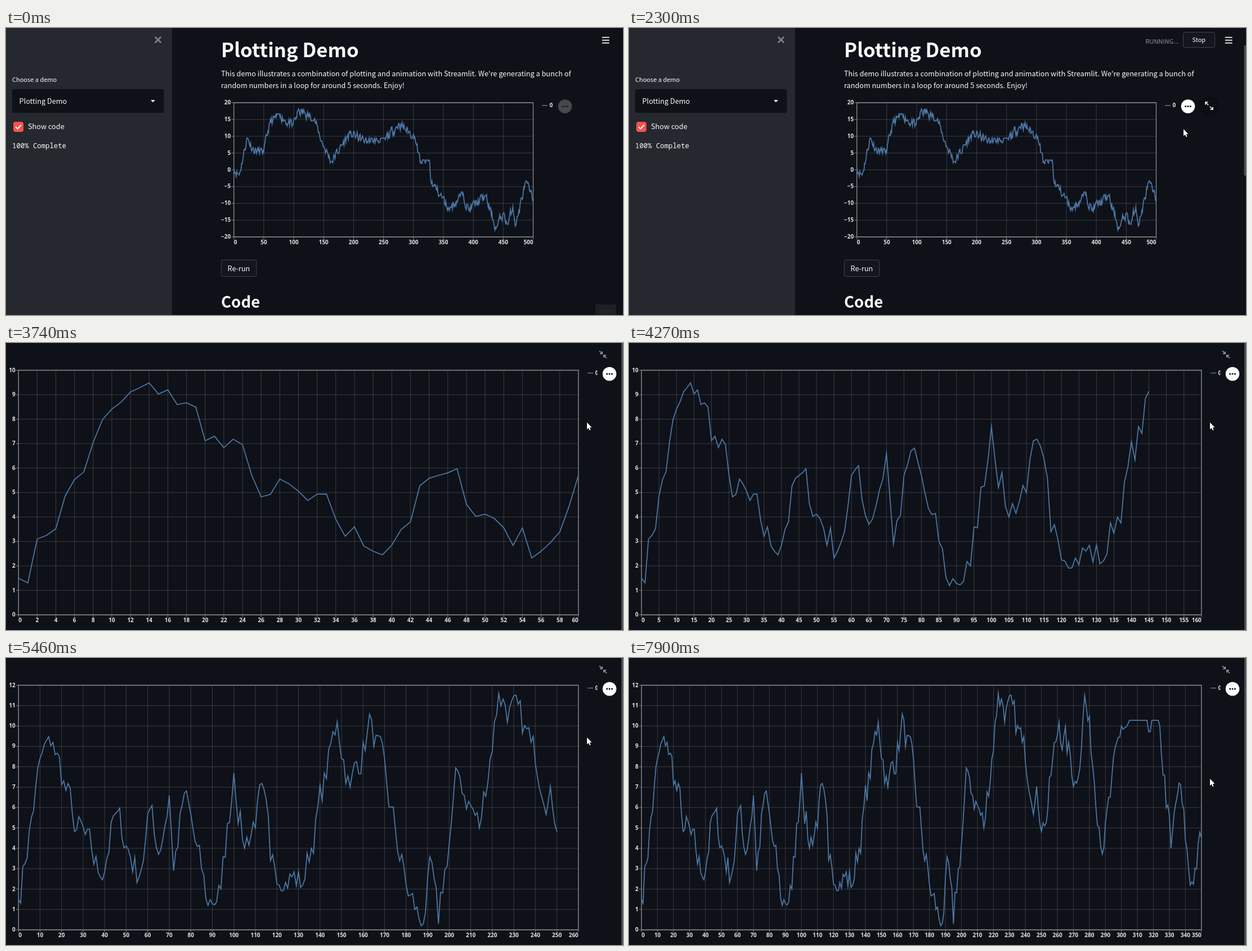
An HTML page with a canvas that plays this animation: 1096x511 px, repeating every 8 s.

```html
<!DOCTYPE html>
<html lang="en">
<head>
<meta charset="utf-8">
<title>Plotting Demo</title>
<style>
html, body { margin: 0; width: 100%; height: 100%; overflow: hidden; background: #0e1117; }
canvas { display: block; width: 1096px; height: 511px; }
</style>
</head>
<body>
<canvas id="stage" width="1096" height="511"></canvas>
<script>
const ctx = document.getElementById('stage').getContext('2d');
const LOOP = 8000, RUN_AT = 2300, FULLSCREEN_AT = 3240, NEW_DATA_AT = 3360;
const BG = '#0e1117', WHITE = '#fafafa', RED = '#ff4b4b', BLUE = '#4c78a8';
const SANS = '"Noto Sans CJK JP", "Noto Sans CJK SC", "Noto Sans CJK", "Open Sans", sans-serif';
const LABEL_FONT = '700 10px "Open Sans", "Noto Sans", sans-serif';

const clamp = (v, low, high) => Math.max(low, Math.min(high, v));

// Piecewise interpolation through [key, value] points.
function along(points, key, ease = p => p) {
  const next = points.findIndex(([k]) => k > key);
  if (next < 0) return points.at(-1)[1];
  if (next === 0) return points[0][1];
  const [k0, v0] = points[next - 1], [k1, v1] = points[next];
  return v0 + (v1 - v0) * ease((key - k0) / (k1 - k0));
}

// Seeded random walk that meets each of the given turning points.
function randomWalk(turns, wobble, seed) {
  const random = () => (seed = (seed * 16807) % 2147483647) / 2147483647;
  const values = [turns[0][1]];
  for (let k = 1; k < turns.length; k++) {
    const [i0, v0] = turns[k - 1], [i1, v1] = turns[k];
    const low = Math.min(v0, v1) - wobble / 3, high = Math.max(v0, v1) + wobble / 3;
    let noise = 0;
    for (let i = i0 + 1; i < i1; i++) {
      noise = noise * .5 + (random() - .5) * 2 * wobble;
      values[i] = clamp(v0 + (v1 - v0) * (i - i0) / (i1 - i0) + noise, low, high);
    }
    values[i1] = v1;
  }
  return values;
}
const firstWalk = randomWalk([
  [0, .5], [9, -1.5], [22, 9.5], [33, 6], [50, 5.3], [60, 14], [78, 16.3], [97, 13], [109, 17.7], [134, 15],
  [150, 7], [163, 2.5], [194, 11], [219, 8.5], [253, 9], [276, 13.8], [302, 9.8], [311, 2.3], [327, 2.5],
  [329, -3.5], [345, -7.5], [359, -11.7], [383, -7], [392, -11.8], [420, -7.8], [438, -17.5], [449, -13.2],
  [458, -16.3], [466, -11], [471, -16.5], [487, -3.7], [500, -9.3]
], 1.3, 11);
const secondWalk = randomWalk([
  [0, 1.5], [11, 8.7], [16, 9.2], [25, 5.7], [38, 2.6], [45, 5.7], [56, 2.6], [62, 6.1], [65, 3.7], [70, 6.6],
  [72, 2.9], [77, 6.7], [88, 1.2], [94, 2], [100, 7.7], [105, 4], [114, 6.9], [117, 3.4], [132, 2.2], [148, 10.2],
  [154, 7], [164, 10.3], [180, 2.2], [187, .2], [192, 3.3], [195, .3], [204, 7.8], [214, 5], [223, 11.6],
  [238, 9.2], [252, 5.1], [261, 10.2], [272, 7.2], [277, 11.5], [289, 4], [300, 10], [324, 10], [331, 4],
  [336, 7.2], [343, 2.2], [350, 4.5]
], .85, 7).map(v => Math.max(.1, v));

// New rows arrive in batches of five, at a pace that varies over time.
const arrivalPace = [[NEW_DATA_AT, 5], [4270, 145], [4800, 215], [6170, 295], [6700, 350]];
const rowsAt = t => Math.floor(along(arrivalPace, t) / 5 + 1e-6) * 5;

const pointerX = [[580, 1062], [1080, 425], [1480, 425], [2100, 985], [RUN_AT, 985], [2790, 1032]];
const pointerY = [[580, 476], [1080, 428], [1480, 428], [2100, 180], [RUN_AT, 180], [2790, 141.5], [7630, 141.5], [7900, 215]];
const smooth = p => p * p * (3 - 2 * p);

function text(str, x, y, size, color = WHITE, weight = 400, align = 'left', family = SANS) {
  ctx.font = `${weight} ${size}px ${family}`;
  ctx.textAlign = align;
  ctx.textBaseline = 'alphabetic';
  ctx.fillStyle = color;
  ctx.fillText(str, x, y);
}
function label(str, x, y, align) {
  ctx.font = LABEL_FONT;
  ctx.textAlign = align;
  ctx.textBaseline = 'middle';
  ctx.fillStyle = '#e0e1e3';
  ctx.fillText(str, x, y);
}
function box(x, y, w, h, r, fill, stroke, width = 1) {
  ctx.beginPath();
  ctx.roundRect(x, y, w, h, r);
  if (fill) { ctx.fillStyle = fill; ctx.fill(); }
  if (stroke) { ctx.strokeStyle = stroke; ctx.lineWidth = width; ctx.stroke(); }
}
function disc(x, y, r, color) {
  ctx.beginPath();
  ctx.arc(x, y, r, 0, 7);
  ctx.fillStyle = color;
  ctx.fill();
}
function trace(points, color, width) {
  ctx.beginPath();
  points.forEach(([x, y]) => ctx.lineTo(x, y));
  ctx.strokeStyle = color;
  ctx.lineWidth = width;
  ctx.stroke();
}

function tickStep(span, count) {
  const raw = span / count, power = 10 ** Math.floor(Math.log10(raw)), e = raw / power;
  return power * (e >= Math.sqrt(50) ? 10 : e >= Math.sqrt(10) ? 5 : e >= Math.SQRT2 ? 2 : 1);
}
function makeAxis(low, high, length) {
  const nice = tickStep(high - low, 10);
  const min = Math.floor(low / nice) * nice, max = Math.ceil(high / nice) * nice;
  const step = tickStep(max - min, Math.ceil(length / 40)), ticks = [];
  for (let v = min; v <= max + step / 100; v += step) ticks.push(+v.toFixed(3));
  return { ticks, at: v => (v - min) / (max - min) * length };
}

function drawChart(values, x0, y0, x1, y1) {
  const xAxis = makeAxis(0, values.length - 1, x1 - x0);
  const yAxis = makeAxis(Math.min(0, ...values), Math.max(...values), y1 - y0);
  const px = v => x0 + xAxis.at(v), py = v => y1 - yAxis.at(v);
  const grid = 'rgba(255,255,255,.2)', frame = '#8b8c8f';

  xAxis.ticks.forEach((v, i) => {
    trace([[px(v), y0], [px(v), y1]], grid, .9);
    trace([[px(v), y1], [px(v), y1 + 4.4]], frame, .9);
    label(v, px(v), y1 + 10.5, i === 0 ? 'left' : i === xAxis.ticks.length - 1 ? 'right' : 'center');
  });
  yAxis.ticks.forEach(v => {
    trace([[x0, py(v)], [x1, py(v)]], grid, .9);
    trace([[x0 - 4.4, py(v)], [x0, py(v)]], frame, .9);
    label(String(v).replace('-', '−'), x0 - 5.5, py(v) + .5, 'right');
  });
  box(x0, y0, x1 - x0, y1 - y0, 0, null, frame, 1.3);
  trace(values.map((v, i) => [px(i), py(v)]), BLUE, 1.75);
}

function drawLegend(x, y) {
  trace([[x, y], [x + 10, y]], BLUE, 1.5);
  label('0', x + 13.5, y + .5, 'left');
}
function drawDots(x, y, active) {
  disc(x, y, 12.3, active ? '#fff' : '#47484b');
  for (const dx of [-4.4, 0, 4.4]) disc(x + dx, y, 1.6, active ? BG : '#1b1d21');
}
// Two diagonal arrows, pointing out from or in to the centre.
function drawResizeIcon(x, y, outward, color) {
  for (const s of [-1, 1]) {
    const tip = outward ? 6.5 : 1.3, tail = outward ? 1.3 : 6.5, arm = outward ? 2 : 5.6;
    trace([[x + s * tip, y + s * tip], [x + s * tail, y + s * tail]], color, 1.6);
    trace([[x + s * arm, y + s * tip], [x + s * tip, y + s * tip], [x + s * tip, y + s * arm]], color, 1.6);
  }
}
function drawLinkIcon(x, y) {
  ctx.save();
  ctx.translate(x, y);
  ctx.rotate(-Math.PI / 4);
  for (const dx of [-8, -1]) box(dx, -3, 9, 6, 3, null, '#8b8c8f', 1.5);
  ctx.restore();
}

function drawSidebar() {
  box(0, 0, 295, 511, 0, '#26282f');
  ctx.lineCap = 'round';
  for (const s of [-1, 1]) trace([[270 - 4.5 * s, 16.5], [270 + 4.5 * s, 25.5]], '#7f8188', 2.6);
  ctx.lineCap = 'butt';
  text('Choose a demo', 11, 96, 11);
  box(11, 109, 269.5, 42, 4, BG);
  text('Plotting Demo', 23.5, 134.5, 12.7);
  ctx.fill(new Path2D('M257 128.3h8l-4 4z'));
  box(13, 167, 18, 18, 4, '#f9514d');
  trace([[17, 176], [20.5, 179.5], [27, 172.5]], '#fff', 2);
  text('Show code', 39, 180.3, 12.7);
  text('100% Complete', 11, 214.3, 12.3, WHITE, 400, 'left', '"Noto Sans Mono", "DejaVu Sans Mono", monospace');
}

function drawPage(t) {
  const chartHovered = t >= 1650;
  const buttonHovered = t >= 1050 && t < 1700, buttonFocused = t >= 1420 && buttonHovered;

  ctx.globalAlpha = 1 - .05 * clamp((t - RUN_AT) / 490, 0, 1);
  text('Plotting Demo', 382, 52, 34.7, WHITE, 700);
  text("This demo illustrates a combination of plotting and animation with Streamlit. We're generating a bunch of", 382, 86, 12.7);
  text('random numbers in a loop for around 5 seconds. Enjoy!', 382, 107, 12.7);
  drawChart(firstWalk, 404.7, 133, 936.5, 372);
  drawLegend(952, 138);
  drawDots(993, 139.5, chartHovered && t < 2600);
  if (chartHovered) {
    disc(1030.5, 138.5, 17.5, '#0b0d13');
    drawResizeIcon(1030.5, 138.5, true, WHITE);
  }
  if (buttonFocused) box(380.5, 411.5, 66, 33, 5, null, 'rgba(255,75,75,.5)', 3);
  box(382.3, 413, 62.5, 29.5, 3.5, '#13161e', buttonHovered ? RED : '#42444c');
  text('Re-run', 413.4, 432.5, 12.7, buttonHovered ? RED : WHITE, 400, 'center');
  text('Code', 382, 498, 27.6, WHITE, 700);
  if (t >= 640 && t < 850) drawLinkIcon(360, 488);
  ctx.globalAlpha = 1;

  drawSidebar();
  for (const y of [16.7, 21.7, 26.7]) trace([[1058.8, y], [1071.7, y]], WHITE, 1.7);
  if (t >= RUN_AT) {
    text('RUNNING...', 917.5, 27.5, 11, '#92949a');
    box(984.5, 7.5, 56, 27, 3.5, '#13161e', '#42444c');
    text('Stop', 1012.3, 25, 11, WHITE, 400, 'center');
  }
  if (t < 580) {
    box(1047, 492, 37, 19, 0, '#1d1f23');
    text('Save', 1065.5, 508, 11, '#2d2f33', 400, 'center');
  } else {
    box(1092.5, 31, 5, 232, 2, '#4b4d53');
  }
}

function drawFullscreen(t) {
  drawChart(t < NEW_DATA_AT ? firstWalk : secondWalk.slice(0, rowsAt(t) + 1), 22.2, 48.5, 1016.8, 484);
  ctx.save();
  ctx.beginPath();
  ctx.rect(1030, 40, 20.5, 30);
  ctx.clip();
  drawLegend(1033, 53.5);
  ctx.restore();
  drawDots(1072, 55, true);
  drawResizeIcon(1060.5, 20.5, false, '#9a9ca0');
  box(1093, 0, 3, 511, 0, '#4b4d53');
}

const HAND = new Path2D('M-1.5 1.2Q0 -1 1.5 1.2V6.5Q3 5.2 4.2 7Q5.8 6 6.8 7.8Q8.5 7 8.8 9V13Q8.5 15 7.3 16.2V18H-.5V16.4L-4 11.5Q-4.8 9.5-3 9.2L-1.5 10.6Z');
const ARROW = new Path2D('M0 0V12.3L2.8 9.8 4.7 14 6.6 13.2 4.8 9 8.5 8.7Z');

function drawPointer(t) {
  if (t < 580) return;
  const x = along(pointerX, t, smooth), y = along(pointerY, t, smooth);
  const clicking = (t >= 1350 && t < 1550) || (t >= 3170 && t < FULLSCREEN_AT);
  const overButton = (t >= 1050 && t < 1560) || (t >= 2720 && t < FULLSCREEN_AT);
  if (clicking) disc(x, y, 9.5, 'rgba(150,145,18,.92)');
  ctx.save();
  ctx.translate(x, y);
  ctx.strokeStyle = '#101010';
  ctx.lineWidth = 1.2;
  ctx.fillStyle = '#fff';
  const shape = overButton ? HAND : ARROW;
  ctx.stroke(shape);
  ctx.fill(shape);
  ctx.restore();
}

function draw(t) {
  box(0, 0, 1096, 511, 0, BG);
  if (t < FULLSCREEN_AT) drawPage(t);
  else drawFullscreen(t);
  drawPointer(t);
}

let start;
function tick(now) {
  start ??= now;
  draw((now - start) % LOOP);
  requestAnimationFrame(tick);
}
requestAnimationFrame(tick);
</script>
</body>
</html>
```
